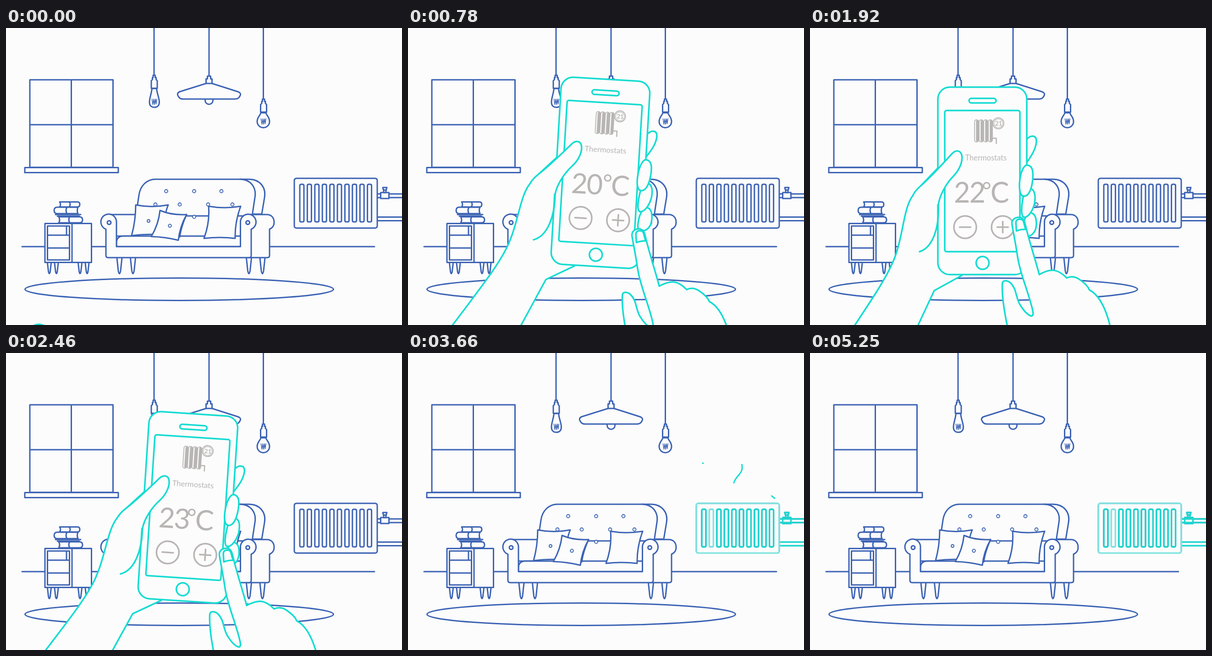
Recreate the animation shown at these times as an HTML page. Size 864x648 px, loop 5.4 s.

```html
<!DOCTYPE html>
<html lang="en">
<head>
<meta charset="utf-8">
<title>Warm living room</title>
<style>
html, body { margin: 0; width: 100%; height: 100%; overflow: hidden; background: #fcfcfc; }
svg { display: block; }
#stage { fill: #fcfcfc; stroke: #3c63b4; stroke-width: 3; stroke-linecap: round; stroke-linejoin: round; }
.line { fill: none; }
.thin { stroke-width: 1.8; }
.teal { stroke: #16dcd2; stroke-width: 3.5; }
.grey { stroke: #b8b5b4; fill: none; }
text { font-family: Lato, "Open Sans", sans-serif; fill: #b8b5b4; stroke: none; }
#temp { font-size: 61px; letter-spacing: -2px; }
</style>
</head>
<body>
<svg id="stage" width="864" height="648" viewBox="0 0 864 648">
  <defs>
    <path id="cap" d="M321 103h4.5v5h2v4.500l2.500 2.500v16.500h-13v-16.500l2.500-2.500v-4.500h1.500z"/>
    <path id="coil" class="line" stroke-width="1.6" d="M318.5 155l2 12 2-12 1.5 12 2-12 1.5 11 1.5-11"/>
    <path id="leg" d="M-5.5 0L-2.5 28Q0 40 2.5 28L5.5 0"/>
  </defs>

  <!-- window -->
  <path d="M52 113h181.5v191H52zM142.5 113v191M52 211h181.5"/>
  <rect x="41" y="304.5" width="204" height="11"/>

  <!-- lamps -->
  <path d="M323 0V102M443 0V105M561.5 0V153"/>
  <path d="M318.5 132C317 146 313 152 313 162C313 170 318 173 323.5 173S334.5 170 334.5 162C334.5 152 330 146 328.5 132z"/>
  <use href="#cap"/><use href="#coil"/>
  <path d="M434.5 155v3a8.5 8.5 0 0 0 17 0v-3"/>
  <path d="M436.5 121L379 139C374 141 373 145 376 149C378 153 381 155 386 155H500C505 155 508 153 510 149C513 145 512 141 506 139L449.5 121"/>
  <path d="M439.5 105h7v6h3v10h-13v-10h3z"/>
  <path d="M556 185c-1 6-8 9-8 19a13.5 13.5 0 0 0 27 0c0-10-7-13-8-19z"/>
  <use href="#cap" x="238.5" y="52"/><use href="#coil" x="238" y="43"/>

  <!-- floor and rug -->
  <path d="M35 477H804"/>
  <ellipse cx="378" cy="570" rx="336.5" ry="24.5"/>

  <!-- cabinet and books -->
  <g id="cabinetLegs"></g>
  <path d="M85 426.5h101.5v85H85zM144 426.5v85M90.5 432h48v74h-48zM90.5 452h48M90.5 480h48M132 432v20"/>
  <path d="M115 412h45q7 0 7 6.5t-7 6.5h-45q4-6 0-13zM139 412q-4 6 0 13"/>
  <path d="M108 407h55M112 410.5h48"/>
  <path d="M157 391h-45q-7 0-7 7t7 7h45q-3-7 0-14zM133 391q-4 7 0 14"/>
  <path d="M117 379.5h39q5 0 5 5.5t-5 5.5h-39q4-5 0-11zM138 379.5q4 5 0 11"/>

  <!-- sofa -->
  <g id="sofaLegs"></g>
  <path d="M510 330h20c24 0 38 18 34 40l-6 36h-40z"/>
  <path d="M286 392L290 365C293 343 308 330 326 330H510C534 330 547 348 543 370L537 410H286"/>
  <g id="buttons" class="thin"></g>
  <path d="M528 407H569C580 407 585 415 585 424C585 432 580 437 575 439V496q0 5-5 5H528z"/>
  <path d="M224 407H283V454H241z"/>
  <path d="M241 477v-8C241 459 246 454 256 454H511.5V477z"/>
  <path d="M241 424A17 17 0 1 0 218 439V496q0 5 5 5H530q5 0 5-5V439A17 17 0 1 0 511.5 424V477H241z"/>
  <circle cx="225" cy="424.5" r="4"/><circle cx="527.5" cy="424.5" r="4"/>
  <path d="M283 386Q318 393 354 386Q344 408 345 452Q310 448 274 453Q283 420 283 386z"/>
  <path class="line" d="M394 407Q382 434 379 456"/>
  <path d="M336 398Q362 409 394 407Q379 434 376 463Q348 456 317 455Q333 428 336 398z"/>
  <path d="M442 389Q477 395 512 389Q499 424 500 459Q466 455 432 459Q445 424 442 389z"/>
  <circle class="thin" cx="311" cy="421" r="3"/><circle class="thin" cx="357.5" cy="431.5" r="3.3"/>

  <g id="radiator"></g>
  <g id="heat" class="line"></g>
  <g id="steam" class="line teal" style="stroke-width:3"></g>

  <g id="phone" class="teal">
    <path d="M473 243C480 234 494 232 494 247C493 265 482 280 474 292"/>
    <path d="M40 735L98 648C135 592 165 548 182 508C204 455 203 395 224 366Q230 354 242 344L290 294L330 500L331 540L271 573L236 648L195 735"/>
    <rect x="279" y="129" width="194" height="409" rx="26"/>
    <rect x="347" y="153.5" width="59" height="10" rx="5"/>
    <rect x="294" y="180" width="164" height="308" rx="4"/>
    <circle cx="376.5" cy="512.5" r="14"/>
    <g class="grey">
      <g id="icon" stroke-width="1.8"></g>
      <path stroke-width="2.5" d="M396 240.5h10.5v11.5"/>
      <circle cx="411" cy="208" r="12" stroke-width="2" fill="#fcfcfc"/>
      <circle cx="411" cy="208" r="9.5" stroke-width="1.2"/>
      <circle cx="338.5" cy="434.5" r="24.5"/><circle cx="420.5" cy="434.5" r="24.5"/>
      <path d="M326.5 434.5h24M408.5 434.5h24M420.5 422.5v24"/>
    </g>
    <text x="404" y="213" font-size="13" font-weight="700">21</text>
    <text x="338.5" y="288.5" font-size="16.5">Thermostats</text>
    <text id="temp" x="314" y="381"><tspan id="digits">20</tspan><tspan id="unit" x="382" dy="-9" font-size="50">°</tspan><tspan dy="9">C</tspan></text>
    <path d="M482 403C492 406 493 415 494 424C494 440 490 445 486 449C482 454 473 456 467 454C462 448 465 430 467 422C470 411 476 404 482 403z"/>
    <path d="M480 350C492 352 492 370 490 382C487 396 478 413 467 413C459 411 462 385 464 375C466 362 472 350 480 350z"/>
    <path d="M473 299C487 300 487 315 486 330C484 350 478 367 467 367C456 367 456 345 458 330C460 315 466 300 473 299z"/>
    <path d="M242 344C265 324 288 298 310 274C318 266 328 266 331 277C334 290 327 308 314 322C298 338 282 365 280 387"/>
    <path class="line" d="M280 387C282 432 270 478 239 488"/>
  </g>

  <g id="hand" class="teal">
    <path d="M424 680C415 640 406 600 407 568C408 560 418 561 424 566C440 580 436 600 448 616C456 628 464 636 472 638C478 636 475 628 473 620C462 580 445 545 439 510C434 480 428 455 425 438C424 428 432 423 441 423C450 424 452 430 455 442C465 480 478 515 487 547C497 541 508 537 518 537C530 538 540 546 547 553C557 548 566 550 574 555C585 562 594 570 597 578C618 588 632 615 642 648L652 690"/>
    <path d="M435 453L433.5 434Q434 428 441 427Q449 427 450 432L455 449Q444 449 435 453z"/>
  </g>
</svg>
<script>
const LOOP = 5400, BLUE = '#3c63b4', TEAL = '#1fd5cf', PALE = '#84e5df';
const $ = id => document.getElementById(id);
const clamp = v => Math.min(1, Math.max(0, v));

function add(parent, tag, attrs) {
  const el = document.createElementNS('http://www.w3.org/2000/svg', tag);
  for (const k in attrs) el.setAttribute(k, attrs[k]);
  return $(parent).appendChild(el);
}

for (const x of [247.5, 277, 530, 559.5])
  add('sofaLegs', 'use', { href: '#leg', x, y: 502 });
for (const x of [94.5, 110, 161.5, 177])
  add('cabinetLegs', 'use', { href: '#leg', transform: `translate(${x} 512) scale(.75 .7)`, 'stroke-width': 4 });
for (const [cx, cy] of [[349.5, 356], [410.5, 356], [470, 356], [326, 385], [379, 385], [441, 385], [494, 385], [410.5, 412]])
  add('buttons', 'circle', { cx, cy, r: 3.5 });
for (let i = 0; i < 4; i++) {
  const x = 359 + i * 10;
  add('icon', 'rect', { x, y: 200.5, width: 9, height: 48, rx: 4 });
  add('icon', 'path', { d: `M${x + 6} 204v41`, 'stroke-width': 5.5 });
}

// Radiator outlines, each starting where the heat enters
const parts = [
  ['M810 362H864', TEAL], ['M810 370H864', TEAL], ['M810 412.5H864', TEAL], ['M810 420.5H864', TEAL],
  ['M805 436.5q5 0 5-5V333q0-5-5-5H634q-5 0-5 5V431.5q0 5 5 5z', PALE],
  ['M835.5 372V359H817.5V372z', TEAL], ['M829 359v-6h-5v6z', TEAL], ['M829.5 353.5l1.5-5.5h-9l1.5 5.5z', TEAL]
];
for (let i = 0; i < 10; i++)
  parts.push([`M${641 + i * 16.4} 420q0 3 3 3h3q3 0 3-3V344q0-3-3-3h-3q-3 0-3 3z`, i == 1 ? PALE : TEAL]);
const heat = parts.map(([d, stroke]) => {
  add('radiator', 'path', { d, stroke: BLUE });
  return add('heat', 'path', { d, stroke, 'stroke-width': 3.4, pathLength: 100 });
});

const steam = [
  [3155, 'M655 317C640 306 640 296 646 284C652 272 660 268 658 256C656 248 650 246 643 240'],
  [3375, 'M718 317C708 300 708 288 712 281C716 268 729 264 729 250C729 242 727 236 724 226'],
  [3630, 'M800 317C784 306 784 296 790 284C796 272 806 268 804 256C802 248 798 246 790 239']
].map(([start, d]) => ({ start, el: add('steam', 'path', { d, pathLength: 100 }) }));

// Each list: time, dx, dy, angle; the phone rests between the two
const enter = [
  [0, -300, 532, 20], [300, -120, 248, 15], [420, 1, 153, 12], [510, 66.5, 91, 10],
  [570, 84, 56, 9], [720, 60, -14, 5], [870, 20, -9, 1.5], [1020, 0, 0, 0], [1140, 0, 0, 0]
];
const leave = [
  [2200, 0, 0, 0], [2300, 0, 0, 0], [2430, 16, -16, 3], [2580, 40, 150, 7], [2770, 60, 620, 14]
];

// Smooth curve through the keys, held still after the last one
function track(keys, t) {
  const last = keys.length - 1;
  let i = 0;
  while (i < last - 1 && t > keys[i + 1][0]) i++;
  const a = keys[i], b = keys[i + 1], p = keys[Math.max(0, i - 1)], n = keys[Math.min(last, i + 2)];
  const h = b[0] - a[0], u = clamp((t - a[0]) / h);
  return [1, 2, 3].map(c => {
    const d = b[c] - a[c];
    if (!d) return a[c];
    const m0 = (b[c] - p[c]) / (b[0] - p[0]) * h, m1 = (n[c] - a[c]) / (n[0] - a[0]) * h;
    return a[c] + u * (m0 + u * (3 * d - 2 * m0 - m1 + u * (m0 + m1 - 2 * d)));
  });
}

function show(el, on) { el.style.display = on ? '' : 'none'; }

function trim(el, from, to) {
  show(el, to > from);
  el.setAttribute('stroke-dasharray', `${100 * (to - from)} 300`);
  el.setAttribute('stroke-dashoffset', -100 * from);
}

function draw(t) {
  const [dx, dy, angle] = track(t < 2000 ? enter : leave, t);
  $('phone').setAttribute('transform', `translate(${dx} ${dy}) rotate(${angle} 376 335)`);
  show($('phone'), t < 2770);

  const degrees = 20 + (t >= 1290) + (t >= 1740) + (t >= 2190);
  $('digits').textContent = degrees;
  $('unit').setAttribute('x', degrees == 20 ? 382 : 375);

  // The finger swings in, taps three times and leaves
  const away = (1 - clamp((t - 495) / 540)) ** 3 + clamp((t - 2310) / 400) ** 3;
  const lift = t < 1035 || t > 2385 ? 1 : (1 - Math.cos((t - 1260) / 450 * 2 * Math.PI)) / 2;
  $('hand').setAttribute('transform',
    `translate(${13 * lift + 460 * away} ${-10 * lift + 245 * away}) rotate(${1.3 * lift} 450 560)`);
  show($('hand'), t > 495 && t < 2710);

  const warm = clamp((t - 2720) / 620);
  heat.forEach(el => trim(el, 0, warm));

  for (const { start, el } of steam) {
    const age = t < start ? 0 : (t - start) % 1110;
    const done = t >= start + 2 * 1110;
    trim(el, clamp((age - 160) / 350), done ? 0 : clamp(age / 350));
  }
}

const begin = performance.now();
function tick() {
  draw((performance.now() - begin) % LOOP);
  requestAnimationFrame(tick);
}
tick();
</script>
</body>
</html>
```
